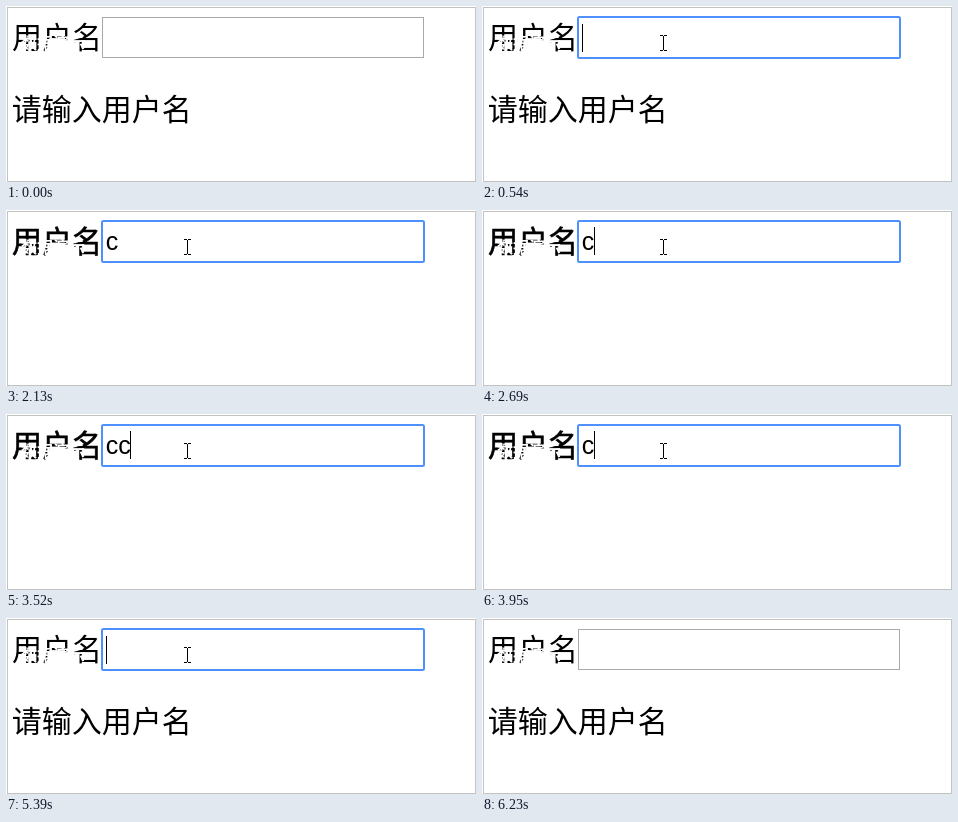
Recreate the animation shown at these times as an HTML page. Size 470x176 px, loop 6.32 s.

```html
<!DOCTYPE html>
<html lang="zh">
<head>
<meta charset="utf-8">
<style>
html, body { margin: 0; width: 100%; height: 100%; overflow: hidden; background: #fff; }
svg { display: block; width: 470px; height: 176px; }
.cjk { font: 30px "Noto Sans CJK SC", "Noto Sans CJK", sans-serif; }
.typed { font: 25px "Liberation Sans", Arial, sans-serif; }
.mark { font: 700 16px "Noto Sans CJK SC", "Noto Sans CJK", sans-serif; fill: #fff; }
</style>
</head>
<body>
<svg viewBox="0 0 470 176">
  <rect width="470" height="176" fill="#fff"/>
  <rect x="1.5" y="1.5" width="468" height="174" fill="none" stroke="#c3c3c3"/>
  <text id="label" class="cjk" x="6" y="42" stroke="#000" stroke-width="0">用户名</text>
  <text class="mark" x="15" y="43">数据演示</text>
  <rect id="idle" x="96.5" y="11.5" width="321" height="40" fill="#fff" stroke="#a9a9a9"/>
  <rect id="focus" x="96" y="11" width="322" height="41" rx="1.5" fill="#fff" stroke="#4d90fe" stroke-width="2"/>
  <text id="value" class="typed" x="99.7" y="40"></text>
  <rect id="caret" width="1" height="28"/>
  <text id="hint" class="cjk" x="5.7" y="114">请输入用户名</text>
  <g id="mouse">
    <path id="beam" d="M-3.5 -7.5h3M.5 -7.5h3M0 -7V7M-3.5 7.5h3M.5 7.5h3" fill="none" stroke="#000"/>
    <path id="arrow" d="M0 0V16.5L4 13L6.5 18.5L9 17.5L6.5 12H11.5Z" fill="#fff" stroke="#000"/>
  </g>
</svg>
<script>
const LOOP = 6320, FOCUS = 540, BLUR = 6230;
const BLINK = 520, TYPE_GAP = 200, ERASE_GAP = 170, LETTERS = 3;
const rounds = [{ type: 830, erase: 1930 }, { type: 2690, erase: 3360 }, { type: 3950, erase: 4650 }];

const $ = id => document.getElementById(id);
const show = (id, on) => $(id).setAttribute("visibility", on ? "visible" : "hidden");
const presses = (t, start, gap) =>
  t < start ? 0 : Math.min(LETTERS, 1 + Math.floor((t - start) / gap));

// Letters in the field, and whether the caret is lit; typing restarts its blink
function field(t) {
  const round = rounds.findLast(r => r.type <= t);
  if (!round) return { count: 0, lit: t >= FOCUS };
  const typed = presses(t, round.type, TYPE_GAP);
  const lastKey = round.type + (typed - 1) * TYPE_GAP;
  return {
    count: typed - presses(t, round.erase, ERASE_GAP),
    lit: t < BLUR && Math.floor((t - lastKey) / BLINK) % 2 === 0
  };
}

// Pointer position, or null when it is off stage
function pointer(t) {
  if (t < 40 || t >= 5920) return null;
  const before = Math.max(0, 1 - (t - 40) / 440);
  const after = Math.max(0, (t - 5590) / 330);
  return {
    x: Math.round(181 + 10 * before ** 2 - 16 * after),
    y: Math.round(37 + 96 * before ** 2 + 140 * after ** 2)
  };
}

function draw(t) {
  const { count, lit } = field(t);
  const focused = t >= FOCUS && t < BLUR;
  show("idle", !focused);
  show("focus", focused);
  show("hint", !count);
  show("caret", lit);
  $("value").textContent = "c".repeat(count);
  $("label").setAttribute("stroke-width", count ? 0.6 : 0);
  $("caret").setAttribute("x", Math.floor(100 + 12.45 * count));
  $("caret").setAttribute("y", count ? 17 : 18);

  const pos = pointer(t);
  const inside = pos && pos.y < 53;
  show("beam", inside);
  show("arrow", pos && !inside);
  if (pos) $("mouse").setAttribute("transform", `translate(${pos.x + 0.5} ${pos.y})`);
}

function tick(now) {
  draw(now % LOOP);
  requestAnimationFrame(tick);
}
draw(0);
requestAnimationFrame(tick);
</script>
</body>
</html>
```
